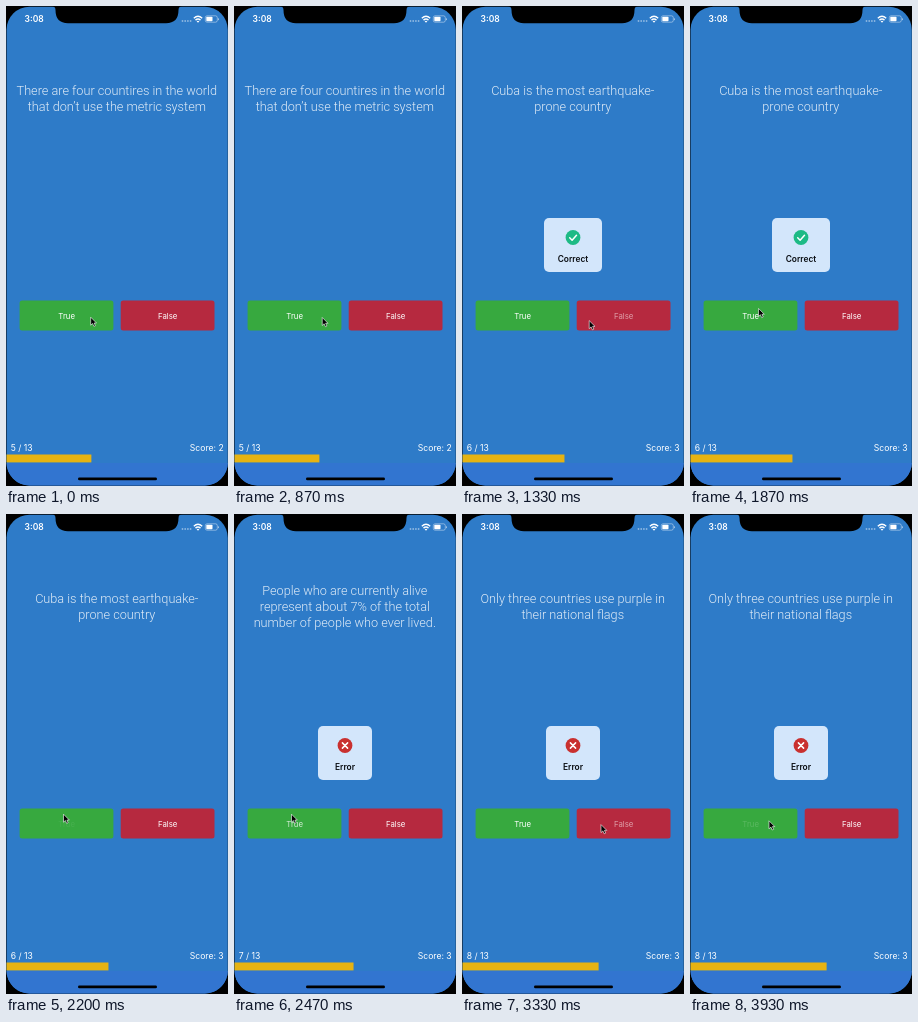
Animation of 222 by 480 pixels, one loop 3.99 s. Source, as an HTML page:

```html
<!DOCTYPE html>
<html lang="en">
<head>
<meta charset="utf-8">
<title>Quiz</title>
<style>
  html, body { margin: 0; width: 100%; height: 100%; overflow: hidden; background: #000; }
  svg { display: block; width: 100vw; height: 100vh; }
  text { font-family: Inter, Roboto, sans-serif; fill: #fff; }
  .question { font: 300 12.7px Roboto, Inter, sans-serif; text-anchor: middle; fill-opacity: .85; }
  .button { font-size: 7.8px; text-anchor: middle; }
  .footer { font-size: 8.6px; }
  .clock { font-size: 8.5px; font-weight: 600; }
  .verdict { font-size: 8.4px; font-weight: 600; fill: #0b0f14; text-anchor: middle; }
</style>
</head>
<body>
<svg viewBox="0 0 222 480">
  <defs>
    <clipPath id="screen"><rect x=".5" y=".7" width="221.3" height="478.7" rx="23"/></clipPath>
  </defs>
  <rect width="222" height="480" fill="#000"/>
  <g clip-path="url(#screen)">
    <rect width="222" height="480" fill="#2e7bc8"/>
    <rect y="457" width="222" height="23" fill="#3275d0"/>
    <rect id="bar" y="448.5" height="7.9" fill="#e6b312"/>
  </g>
  <path d="M45 0Q49.5 0 49.5 4Q49.5 17.2 62 17.2H160Q172.5 17.2 172.5 4Q172.5 0 177 0Z"/>
  <text class="clock" x="18.6" y="16.2">3:08</text>
  <g fill="#fff">
    <g opacity=".45">
      <circle cx="176.5" cy="15" r=".9"/><circle cx="179.2" cy="15" r=".9"/>
      <circle cx="181.9" cy="15" r=".9"/><circle cx="184.6" cy="15" r=".9"/>
    </g>
    <g fill="none" stroke="#fff" stroke-width="1.4">
      <path d="M187.8 12.2Q192 8.4 196.2 12.2M189.5 14.1Q192 11.9 194.5 14.1"/>
    </g>
    <path d="M190.6 15.3Q192 14.2 193.4 15.3L192 16.8Z"/>
    <rect x="199.3" y="9.8" width="12" height="6.4" rx="1.8" fill="none" stroke="#fff" stroke-width=".7" opacity=".6"/>
    <rect x="200.3" y="10.8" width="6.2" height="4.4" rx=".8"/>
    <rect x="212" y="12" width=".9" height="2.2" rx=".4" opacity=".6"/>
  </g>
  <g id="question"></g>
  <rect x="13.6" y="294.4" width="93.8" height="30.2" rx="2.5" fill="#37a93f"/>
  <rect x="114.7" y="294.4" width="93.8" height="30.2" rx="2.5" fill="#b6293f"/>
  <text class="button" id="true" x="60.7" y="312.9">True</text>
  <text class="button" id="false" x="161.7" y="312.9">False</text>
  <text class="footer" id="count" x="4.8" y="444.8"></text>
  <text class="footer" id="score" x="217.7" y="444.8" text-anchor="end"></text>
  <rect x="72" y="471.5" width="79" height="2.8" rx="1.4"/>
  <g id="popup">
    <rect id="card" y="212" height="54" rx="5" fill="#d3e6fb"/>
    <circle id="badge" cx="111" cy="231.5" r="7.4"/>
    <path id="mark" fill="none" stroke="#fff" stroke-width="1.5" stroke-linecap="round" stroke-linejoin="round"/>
    <text class="verdict" id="verdict" x="111" y="255.5"></text>
  </g>
  <path id="cursor" d="M0 0V8L1.9 6.3L3.2 9.2L4.7 8.5L3.4 5.8H5.8Z" fill="#000" stroke="#fff" stroke-width=".6" stroke-linejoin="round"/>
</svg>
<script>
const LOOP = 3990, STEP = 1000 / 15;
const $ = id => document.getElementById(id);

const rounds = [
  { from: 0, number: 5, score: 2, lines: ["There are four countires in the world", "that don’t use the metric system"] },
  { from: 1200, number: 6, score: 3, lines: ["Cuba is the most earthquake-", "prone country"] },
  { from: 2270, number: 7, score: 3, lines: ["People who are currently alive", "represent about 7% of the total", "number of people who ever lived."] },
  { from: 3200, number: 8, score: 3, lines: ["Only three countries use purple in", "their national flags"] }
];

const popups = [
  { show: 1200, hide: 1900, word: "Correct" },
  { show: 2270, hide: 2910, word: "Error" },
  { show: 3200, hide: 9999, word: "Error" }
];
const looks = {
  Correct: { width: 58, color: "#1dba85", mark: "M107.7 231.8L110.1 234.2L114.5 229.2" },
  Error: { width: 54, color: "#c9302f", mark: "M108.4 228.9L113.6 234.1M113.6 228.9L108.4 234.1" }
};

const presses = {
  true: [[2070, 2270], [3835, 9999]],
  false: [[1070, 1200], [2970, 3200]]
};

// Each move: start, end, target x, target y
const moves = [
  [810, 1130, 127.2, 314.6],
  [1530, 1980, 57.5, 300.2],
  [2530, 2910, 139, 310.6],
  [3570, 3850, 79, 306.8]
];

const progress = (t, start, length) => Math.min(1, Math.max(0, (t - start) / length));
const smooth = p => p * p * (3 - 2 * p);

function cursorAt(t) {
  let x = 84.7, y = 311.2;
  for (const [start, end, toX, toY] of moves) {
    const p = smooth(progress(t, start, end - start));
    x += (toX - x) * p;
    y += (toY - y) * p;
  }
  return [x, y];
}

function labelOpacity(t, spans) {
  const span = spans.filter(([down]) => t >= down).pop();
  if (!span) return 1;
  const [down, up] = span;
  return t < up ? 1 - 0.93 * progress(t, down, 110) : 0.07 + 0.93 * progress(t, up, 260);
}

let shownRound;
function drawRound(round) {
  if (round === shownRound) return;
  shownRound = round;
  const top = round.lines.length > 2 ? 81.3 : 89.3;
  $("question").innerHTML = round.lines
    .map((line, i) => `<text class="question" x="110.8" y="${top + i * 16}">${line}</text>`).join("");
  $("count").textContent = `${round.number} / 13`;
  $("score").textContent = `Score: ${round.score}`;
  $("bar").setAttribute("width", 222 * round.number / 13);
}

function drawPopup(t) {
  const popup = popups.filter(p => t >= p.show).pop();
  const shown = popup ? progress(t, popup.show, 120) : 0;
  const hidden = popup ? progress(t, popup.hide, 230) : 0;
  const scale = 1.3 - 0.3 * shown - 0.3 * hidden;
  $("popup").setAttribute("opacity", shown * (1 - hidden));
  $("popup").setAttribute("transform", `translate(111 239) scale(${scale}) translate(-111 -239)`);
  if (!popup) return;
  const look = looks[popup.word];
  $("card").setAttribute("x", 111 - look.width / 2);
  $("card").setAttribute("width", look.width);
  $("badge").setAttribute("fill", look.color);
  $("mark").setAttribute("d", look.mark);
  $("verdict").textContent = popup.word;
}

function draw(time) {
  // The picture advances fifteen times a second
  const t = Math.floor((time % LOOP + 4) / STEP) * STEP;
  drawRound(rounds.filter(r => t >= r.from).pop());
  drawPopup(t);
  for (const id in presses) $(id).setAttribute("opacity", labelOpacity(t, presses[id]));
  $("cursor").setAttribute("transform", `translate(${cursorAt(t)})`);
}

const begin = performance.now();
function tick() {
  draw(performance.now() - begin);
  requestAnimationFrame(tick);
}
tick();
</script>
</body>
</html>
```
